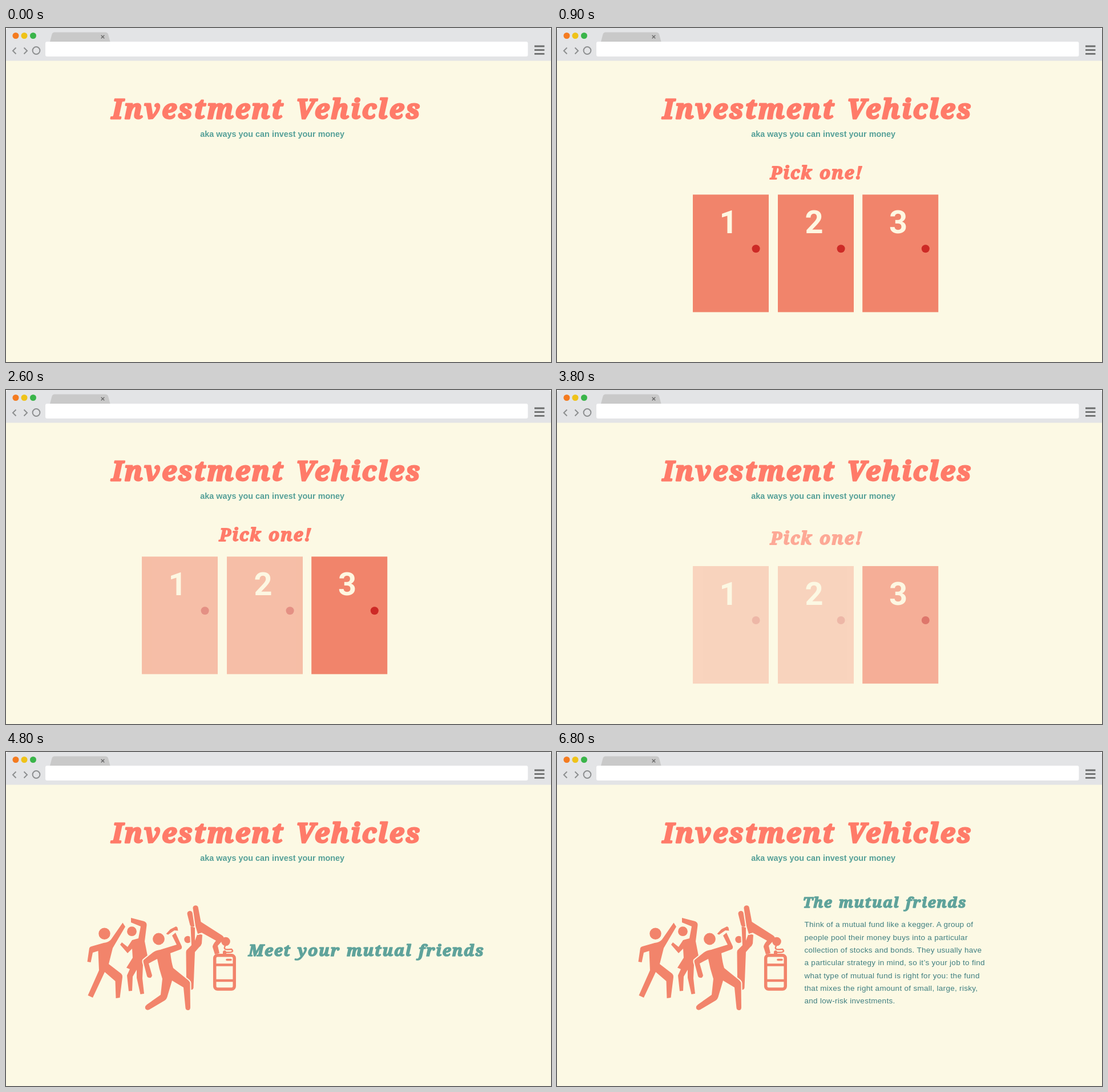
These frames come from a looping animation (955x586 px, 8 s). An HTML page:

```html
<!DOCTYPE html>
<html lang="en">
<head>
<meta charset="utf-8">
<title>Investment Vehicles</title>
<style>
  html, body { margin: 0; width: 100%; height: 100%; overflow: hidden; background: #fff; }
  svg { display: block; width: 100%; height: 100%; }
  .display {
    font: italic 700 48px "Noto Serif", serif;
    fill: #ff7b69; stroke: #ff7b69; stroke-width: .06em; stroke-linejoin: round;
    text-anchor: middle; letter-spacing: .06em; word-spacing: .08em;
  }
  .teal { fill: #5fa39b; stroke: #5fa39b; }
  .subtitle { font: 700 14.4px "Liberation Sans", Arial, sans-serif; fill: #55a098; text-anchor: middle; }
  .copy { font: 13.5px "Liberation Sans", Arial, sans-serif; letter-spacing: .3px; fill: #3f7f80; }
  .number { font: 700 56px Roboto, sans-serif; fill: #fef7e1; text-anchor: middle; }
  .line { fill: none; stroke: #f2846b; stroke-linecap: round; }
  .gap { stroke: #fcf9e4; stroke-width: 4; paint-order: stroke; stroke-linejoin: round; }
</style>
</head>
<body>
<svg viewBox="0 0 955 586">
  <path fill="#fcf9e4" d="M0 57H955V586H0Z"/>

  <!-- browser bar -->
  <path fill="#e3e4e6" d="M0 57.500V5Q0 0 5 0H950Q955 0 955 5V57.500Z"/>
  <circle cx="17" cy="13.500" r="5.500" fill="#f47b20"/>
  <circle cx="32" cy="13.500" r="5.500" fill="#efc319"/>
  <circle cx="47.500" cy="13.500" r="5.500" fill="#3ab54a"/>
  <path fill="#c9c9c9" d="M77 24L80.500 11Q81.500 7.500 85 7.500H174Q178 7.500 179 11L182.500 24Z"/>
  <path stroke="#666" stroke-width="1.300" d="M166.700 12.700l5.600 5.600m0-5.600l-5.600 5.600"/>
  <rect x="69" y="24" width="845.500" height="26" rx="3" fill="#fff"/>
  <g fill="none" stroke="#8d8f90" stroke-width="2">
    <path d="M17.500 34.500L12 40L17.500 45.500M31.500 34.500L37 40L31.500 45.500"/>
    <circle cx="53" cy="39.500" r="6.400"/>
  </g>
  <path stroke="#6b6c6c" stroke-width="2.800" d="M926 32H943.500M926 38.700H943.500M926 45.300H943.500"/>

  <text class="display" x="456.500" y="158.500">Investment Vehicles</text>
  <text class="subtitle" x="466.700" y="191">aka ways you can invest your money</text>

  <text id="prompt" class="display" style="font-size:31px" x="455" y="265">Pick one!</text>
  <g id="doors"></g>

  <g id="party" fill="#f2846b">
    <!-- dancer with raised arm -->
    <circle cx="172.500" cy="318.700" r="10.200"/>
    <path d="M146 344Q147 341.500 150 341L171 335Q180 334 184 329L204.500 299.500L209 306.500L187 344L180 372L202 389Q204 391 204 395L199.500 431L192.500 432L191.500 402L173 386L152 431L143.500 427L163 383L161.500 349L152 352L148.500 369L142.500 368Z"/>
    <!-- dancer in a skirt -->
    <circle cx="220.500" cy="314.700" r="8.400"/>
    <path d="M219 291L242 297Q247 299 246.500 304L243 332L248 358L240 373L239 397L242 424L235.500 425L229 396L229 382L222 394L221 419L215 419.500L212 392L217 381L211 378.500L222 361L221 345L213 353L200 338L203 334L213 342L221 330L232 327L236 306L219 299Z"/>
    <!-- helper holding the legs -->
    <circle cx="318.500" cy="329" r="6.200"/>
    <path class="gap" d="M315.500 351Q316 347 319 345L325 339L323.500 306L331 308L331 331L336 318L344 321L343 336Q342 340 338 343L331 351L328.500 414Q327 418 323 417L316 398Z"/>
    <!-- keg stand -->
    <path class="line" stroke-width="9.500" d="M322.300 283.500L327 302"/>
    <path class="gap" d="M327.500 274A4.700 4.700 0 0 1 336.800 273L341.500 298L379 322Q384 326 380 330L371 340L374 353L366 355L362 342Q362 338 368 331L343 317L336 319L332 305Z"/>
    <circle cx="385" cy="332.500" r="7.800"/>
    <path class="line" stroke-width="2.500" d="M384 340C379 349 391 346 395 346C400 350 395 352 388 351.500L382 352"/>
    <path d="M380 355V350Q383 346 386 350V355Z"/>
    <rect class="line" stroke-width="5.500" x="365.700" y="356.800" width="34.500" height="59.300" rx="5"/>
    <path class="line" stroke-width="4.500" d="M366 373.500H400M366 401H400"/>
    <path class="line" stroke-width="3.500" d="M387 364.500H394"/>
    <!-- drinker in front -->
    <path class="gap" d="M241 365L257 352Q262 348 270 347L299 338L291 322L297 317L308 341Q309 346 304 347L288 353Q290 370 293 379L320 401Q323 404 322.500 407L323 448Q323 453 319 453Q315 453 314.500 449L311 413L291 401L283 428Q282 433 278 436L251 452Q246 454 244 450Q243 446 247 443L271 426L274 398Q268 380 265 363L250 371L256 392Q255 397 251 396Q248 396 247 393L241 370Q240 367 241 365Z"/>
    <circle cx="267.500" cy="328" r="10.400"/>
    <path d="M280.500 319L288 311L298 306L300.500 308L301.500 313.500L295 313L284 320.500Z"/>
  </g>

  <text id="greeting" class="display teal" style="font-size:28px" x="631.500" y="358">Meet your mutual friends</text>
  <g id="article">
    <text class="display teal" style="font-size:26px" x="574.300" y="272.500">The mutual friends</text>
  </g>
</svg>
<script>
const SVG = "http://www.w3.org/2000/svg";
const LOOP = 8000, STEP = 100;
const $ = id => document.getElementById(id);

function add(parent, tag, attrs, text = "") {
  const node = document.createElementNS(SVG, tag);
  for (const name in attrs) node.setAttribute(name, attrs[name]);
  node.textContent = text;
  return parent.appendChild(node);
}

const doors = [[238, 300.5], [387, 450.5], [535.2, 598]].map(([x, numberX], i) => {
  const door = add($("doors"), "g", {});
  add(door, "rect", { x, y: 292.3, width: 133, height: 206.2, fill: "#f1846b" });
  add(door, "circle", { cx: x + 110.6, cy: 387.3, r: 7, fill: "#cd2a26" });
  add(door, "text", { x: numberX, y: 360.3, class: "number" }, i + 1);
  return door;
});

[
  "Think of a mutual fund like a kegger. A group of",
  "people pool their money buys into a particular",
  "collection of stocks and bonds. They usually have",
  "a particular strategy in mind, so it’s your job to find",
  "what type of mutual fund is right for you: the fund",
  "that mixes the right amount of small, large, risky,",
  "and low-risk investments.",
].forEach((line, i) => add($("article"), "text", { x: 433.5, y: 307.3 + i * 22.3, class: "copy" }, line));

// Progress from 0 to 1 in equal steps, the first one taken at `start`.
function ramp(time, start, steps) {
  const taken = Math.floor((time - start) / STEP) + 1;
  return Math.min(1, Math.max(0, taken / steps));
}

function show(node, opacity, y = 0) {
  node.setAttribute("opacity", opacity);
  node.setAttribute("transform", `translate(0 ${y})`);
}

function render(time) {
  const leaving = time < 3800 ? 0 : time < 3900 ? .37 : 1;
  const present = ramp(time, 600, 4) * (1 - leaving);
  show($("prompt"), present, 17 * (1 - present));
  show($("doors"), 1, 45 * (1 - present));
  const dim = time < 2500 ? 1 : time < 2600 ? .64 : .5;
  doors.forEach((door, i) => show(door, present * (i < 2 ? dim : 1)));

  const arrived = ramp(time, 4100, 3);
  show($("party"), arrived, 23 * (1 - arrived));
  show($("greeting"), ramp(time, 4400, 5) * (1 - ramp(time, 6300, 3)));
  show($("article"), ramp(time, 6700, 2));
}

const begin = performance.now();
function tick() {
  render((performance.now() - begin) % LOOP);
  requestAnimationFrame(tick);
}
tick();
</script>
</body>
</html>
```
